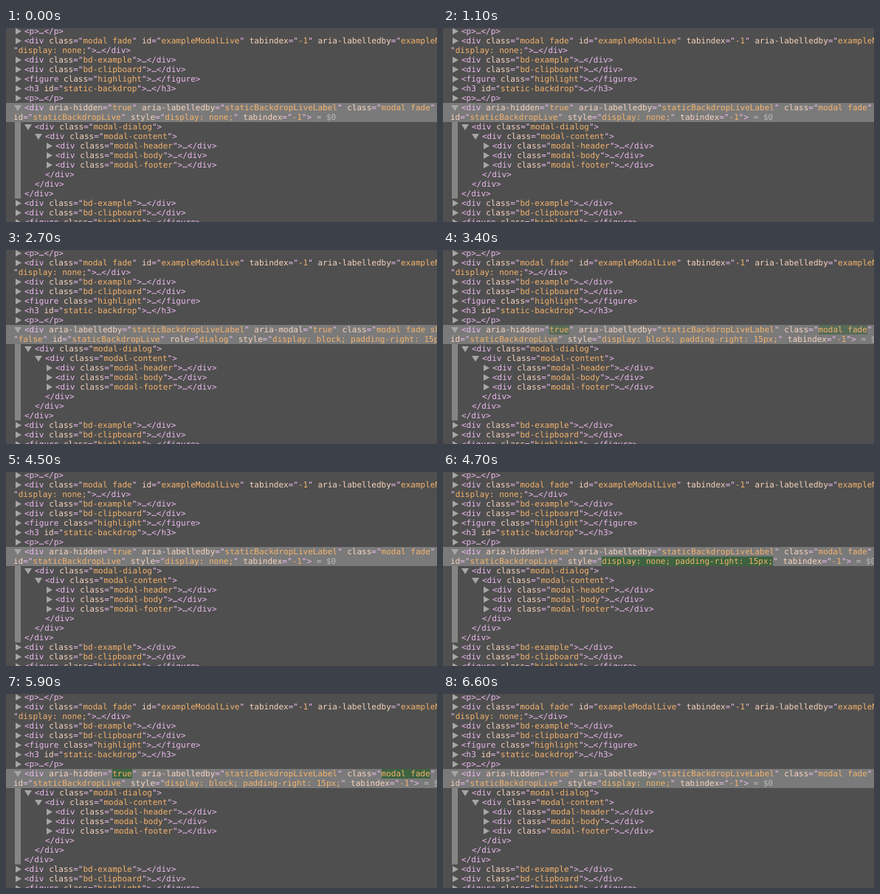
An HTML page that plays this animation: 584x264 px, repeating every 6.7 s.

```html
<!DOCTYPE html>
<html lang="en">
<head>
<meta charset="utf-8">
<style>
html, body { margin: 0; width: 100%; height: 100%; overflow: hidden; background: #4f4f4f; }
#tree {
  position: relative; width: 584px; height: 264px; overflow: hidden;
  font: 11px/13px "DejaVu Sans Mono", monospace;
  text-rendering: geometricPrecision; color: #ebb9ee;
}
#tree > * { position: absolute; white-space: pre; }
.band { left: 0; top: 102px; width: 584px; height: 26px; background: #7a7a7a; }
.guide { left: 12px; top: 128px; width: 8px; height: 104px; background: #858585; }
.arrow { width: 8px; height: 9px; background: #a6a6a6; clip-path: polygon(0 0, 100% 50%, 0 100%); }
.arrow.open { width: 10px; height: 8px; clip-path: polygon(0 0, 100% 0, 50% 100%); }
.name { color: #f6d3bd; }
.value { color: #f3b26c; }
.ref { color: #b9b9b9; }
.now { background: rgba(50, 95, 55, var(--now)); }
.before { background: rgba(50, 95, 55, var(--before)); }
</style>
</head>
<body>
<div id="tree"><div class="band"></div><div class="guide"></div></div>
<script>
const tree = document.getElementById('tree');
const LOOP = 6700, FADE = 600;

// A value starting with * flashes now, with ^ it keeps the previous flash.
const flashClass = { '*': ' now', '^': ' before' };

function paint(text) {
  return text.replace(/</g, '&lt;')
    .replace(/([\w-]+)(?==")|"([*^]?)([^"]*)"/g, (all, name, mark, value) => name
      ? `<span class="name">${name}</span>`
      : `"<span class="value${flashClass[mark] || ''}">${value}</span>"`)
    .replace('= $0', '<span class="ref">= $0</span>');
}

function add(className, x, y) {
  const el = document.createElement('div');
  el.className = className;
  el.style.left = x + 'px';
  el.style.top = y + 'px';
  return tree.appendChild(el);
}

// level -1 is a wrapped line; arrow: '>' closed, 'v' open
function addRow(index, level, arrow, text) {
  const x = level < 0 ? 10 : 25 + 14 * level, y = 13 * index - 2;
  if (arrow === '>') add('arrow', x - 12, y + 2);
  if (arrow === 'v') add('arrow open', x - 14, y + 3);
  const row = add('row', x, y);
  row.innerHTML = paint(text);
  return row;
}

const div = name => `<div class="${name}">`;
const folded = name => div(name) + '…</div>';
const rows = [
  [0, '>', '<p>…</p>'],
  [0, '>', '<div class="modal fade" id="exampleModalLive" tabindex="-1" aria-labelledby="exampleModalLiveLabel" style='],
  [-1, '', '"display: none;">…</div>'],
  [0, '>', folded('bd-example')],
  [0, '>', folded('bd-clipboard')],
  [0, '>', '<figure class="highlight">…</figure>'],
  [0, '>', '<h3 id="static-backdrop">…</h3>'],
  [0, '>', '<p>…</p>'],
  [0, 'v', ''],
  [-1, '', ''],
  [1, 'v', div('modal-dialog')],
  [2, 'v', div('modal-content')],
  [3, '>', folded('modal-header')],
  [3, '>', folded('modal-body')],
  [3, '>', folded('modal-footer')],
  [2, '', '</div>'],
  [1, '', '</div>'],
  [0, '', '</div>'],
  [0, '>', folded('bd-example')],
  [0, '>', folded('bd-clipboard')],
  [0, '>', '<figure class="highlight">…</figure>']
].map((row, i) => addRow(i, ...row));

const label = 'aria-labelledby="staticBackdropLiveLabel"';
const hidden = (mark, style) => [
  `<div aria-hidden="${mark}true" ${label} class="${mark}modal fade"`,
  `id="staticBackdropLive" style="${style}" tabindex="-1"> = $0`
];
const closed = hidden('^', '*display: none;');
const padded = hidden('', '*display: none; padding-right: 15px;');
const closing = hidden('*', 'display: block; padding-right: 15px;');
const opened = [
  `<div ${label} aria-modal="*true" class="*modal fade show" data-backdrop="static" data-keyboard=`,
  '"false" id="staticBackdropLive" role="*dialog" style="*display: block; padding-right: 15px;" tabindex="-1"> = $0'
];

const steps = [
  [-FADE, closed],
  [1600, padded], [2000, opened], [3100, closing], [3500, closed],
  [4600, padded], [5000, opened], [5800, closing], [6050, closed]
];
let shown;

function frame(now) {
  const t = now % LOOP;
  const i = steps.findLastIndex(step => step[0] <= t);
  const alpha = start => Math.max(0, 1 - (t - start) / FADE);
  if (shown !== steps[i][1]) {
    shown = steps[i][1];
    shown.forEach((text, k) => rows[8 + k].innerHTML = paint(text));
  }
  tree.style.setProperty('--now', alpha(steps[i][0]));
  tree.style.setProperty('--before', i ? alpha(steps[i - 1][0]) : 0);
  requestAnimationFrame(frame);
}
frame(performance.now());
</script>
</body>
</html>
```
